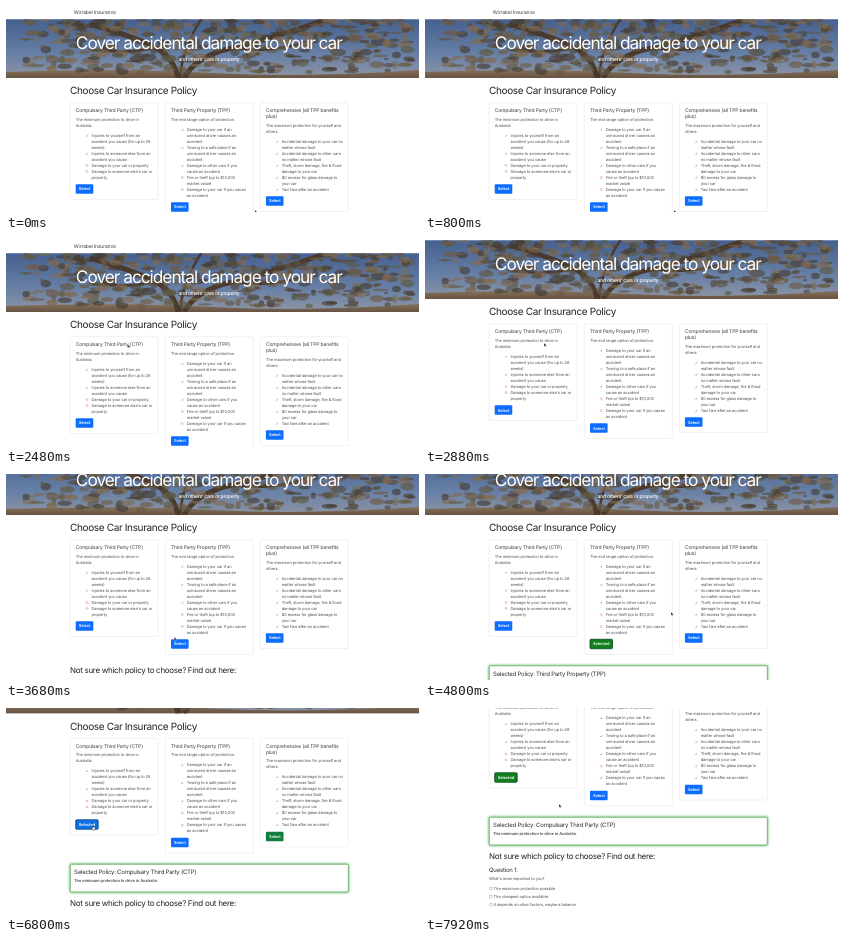
Write an HTML page that moves like this. It is 413 px wide and 206 px high and loops after 8 s.

```html
<!DOCTYPE html>
<html lang="en">
<head>
<meta charset="utf-8">
<title>Car insurance policies</title>
<style>
html, body { margin: 0; height: 100%; overflow: hidden; background: #fff; }
svg { display: block; width: 100vw; height: 100vh; }
text {
  font-family: Inter, Roboto, sans-serif; font-size: 4px; fill: #4a4f54;
  letter-spacing: -.02em; text-rendering: geometricPrecision; font-optical-sizing: none;
}
.h5 { font-size: 5px; letter-spacing: -.029em; fill: #3a3f44; }
.h4 { font-size: 6px; letter-spacing: -.037em; fill: #2a2e32; }
.h2 { font-size: 8px; letter-spacing: -.037em; fill: #212529; }
.h1 { font-size: 10px; letter-spacing: -.035em; fill: #212529; }
.hero { font-size: 17.3px; letter-spacing: -.0586em; }
.lead { font-size: 5px; font-weight: 500; letter-spacing: -.045em; }
.mid { text-anchor: middle; }
.w { fill: #fff; }
.b { font-weight: 600; letter-spacing: -.015em; }
.yes { fill: none; stroke: #4c6a5a; stroke-width: .45; }
.no { fill: none; stroke: #e57580; stroke-width: .35; }
.card { fill: #fff; stroke: #ebebeb; stroke-width: .7; }
</style>
</head>
<body>
<svg viewBox="0 0 413 206" preserveAspectRatio="none">
  <defs>
    <linearGradient id="sky" x2="0" y2="1">
      <stop stop-color="#45608f"/><stop offset=".6" stop-color="#6880a6"/><stop offset="1" stop-color="#8d95a3"/>
    </linearGradient>
    <linearGradient id="soil" x2="0" y2="1">
      <stop stop-color="#857058"/><stop offset="1" stop-color="#665343"/>
    </linearGradient>
    <clipPath id="frame"><path d="M0 13.3H413V72H0z"/></clipPath>
    <filter id="glow" x="-5%" y="-30%" width="110%" height="160%"><feGaussianBlur stdDeviation="1"/></filter>
  </defs>
  <g id="page"></g>
  <g id="cursor">
    <path id="arrow" d="M0 0V3.5L.9 2.7 1.5 4 2 3.8 1.5 2.5H2.6z" fill="#111" stroke="#fff" stroke-width=".3"/>
    <path id="hand" d="M-.4 .3Q0-.4 .4 .3V2L2.2 2.5V4L1.7 5.2H-.4L-1.6 3.2-1.1 2.8-.4 3.3z" fill="#fff" stroke="#111" stroke-width=".45"/>
  </g>
</svg>
<script>
const $ = id => document.getElementById(id);
const text = (x, y, s, cls = '', id = '') =>
  `<text x="${x}" y="${y}" class="${cls}" id="${id}">${s.replace('&', '&amp;')}</text>`;

// "|" breaks a line, a leading "-" marks something not covered
const policies = [
  { x: 64, title: 'Compulsary Third Party (CTP)', info: 'The minimum protection to drive in|Australia.', items: [
    'Injuries to yourself from an|accident you cause (for up to 26|weeks)',
    'Injuries to someone else from an|accident you cause',
    '-Damage to your car or property',
    "-Damage to someone else's car or|property"] },
  { x: 159.3, title: 'Third Party Property (TPP)', info: 'The mid range option of protection.', items: [
    'Damage to your car if an|uninsured driver causes an|accident',
    'Towing to a safe place if an|uninsured driver causes an|accident',
    'Damage to other cars if you|cause an accident',
    '-Fire or theft (up to $10,000|market value)',
    '-Damage to your car if you cause|an accident'] },
  { x: 254.2, title: 'Comprehensive (all TPP benefits|plus)', info: 'The maximum protection for yourself and|others.', items: [
    'Accidental damage to your car no|matter whose fault',
    'Accidental damage to other cars|no matter whose fault',
    'Theft, storm damage, fire & flood|damage to your car',
    '$0 excess for glass damage to|your car',
    'Taxi fare after an accident'] }
];

// soft gum-tree landscape behind the headline
function hero() {
  let seed = 11, out = '<g clip-path="url(#frame)"><path d="M0 13H413V72H0z" fill="url(#sky)"/>';
  const rnd = () => (seed = seed * 16807 % 2147483647) / 2147483647;
  const leaf = ['#54493a', '#6e5b45', '#453d34', '#806a50', '#5f5a44'];
  const limb = (d, w) => `<path d="${d}" fill="none" stroke="#4a3a2e" stroke-width="${w}"/>`;
  out += '<path d="M0 66Q110 62 206 67T413 64V72H0z" fill="url(#soil)"/>'
    + limb('M172 72Q168 52 150 42T84 18M178 72Q190 50 226 42T318 14', 5)
    + limb('M174 72Q176 42 196 12M150 42Q120 48 86 44M226 42Q262 48 300 36', 2.5);
  for (let i = 0; i < 420; i++) {
    const x = 20 + rnd() * 385, y = 13 + 54 * rnd() ** 1.2;
    out += `<ellipse cx="${x}" cy="${y}" rx="${2 + rnd() * 6}" ry="${1 + rnd() * 3}" fill="${leaf[i % 5]}" opacity=".65"/>`;
  }
  return out + '</g>' + text(202.8, 42.6, 'Cover accidental damage to your car', 'hero w mid')
    + text(203, 54.5, "and others' cars or property", 'lead w mid');
}

function card(p, i) {
  const left = p.x + 5.7;
  let y = 104.5, out = '';
  const lines = (s, x, cls, drop) => s.split('|').forEach(l => { out += text(x, y + drop, l, cls); y += 6; });
  lines(p.title, left, 'h5', 1.8);
  y += 3;
  lines(p.info, left, '', 1.45);
  y += 4;
  for (const item of p.items) {
    const x = p.x + 17, no = item[0] == '-';
    out += no
      ? `<path class="no" d="M${x - 1.1} ${y}a1.1 1.1 0 1 0 2.2 0a1.1 1.1 0 1 0-2.2 0M${x - .8} ${y - .8}l1.6 1.6"/>`
      : `<path class="yes" d="M${x - 1} ${y + .3}l.7.7 1.2-1.8"/>`;
    lines(no ? item.slice(1) : item, p.x + 21.5, '', 1.45);
  }
  p.left = left;
  p.y = y + 5.5;
  return `<rect class="card" x="${p.x}" y="96.7" width="88" height="${p.y - 86.2}" rx="1"/>` + out
    + `<rect id="btn${i}" x="${left}" y="${p.y - 4.75}" height="9.5" rx="1"/>` + text(left + 3, p.y + 1.45, '', 'w b', 'label' + i);
}

const box = 'x="64.3" y="222.8" width="278" height="27.6" rx="1"';
const options = ['The maximum protection possible', 'The cheapest option available', 'It depends on other factors, maybe a balance'];
$('page').innerHTML = text(67.8, 8.1, 'Wirrabel Insurance', 'h5') + hero()
  + text(64, 88.4, 'Choose Car Insurance Policy', 'h1') + policies.map(card).join('')
  + `<g id="panel"><rect ${box} fill="none" stroke="#4caf50" stroke-width="1.6" filter="url(#glow)"/>
     <rect ${box} fill="#fff" stroke="#3f963f" stroke-width=".6"/>`
  + text(68, 232.9, '', 'h4', 'chosen') + text(68, 240.7, '', 'b', 'detail') + '</g><g id="quiz">'
  + text(64, 264.4, 'Not sure which policy to choose? Find out here:', 'h2')
  + text(64, 277.7, 'Question 1:', 'h4') + text(64, 285, "What's most important to you?")
  + options.map((s, i) => `<circle cx="65.9" cy="${294 + 8 * i}" r="1.4" fill="#fff" stroke="#777" stroke-width=".4"/>`
    + text(68.6, 295.4 + 8 * i, s)).join('') + '</g>';

const clicks = [[3960, 1], [5800, 2], [6780, 0]];
const scroll = [[2560, 0], [3280, 31], [4800, 31], [5280, 66.5], [7120, 66.5], [7880, 113.5]];
const mouse = [[0, 249, 204], [800, 249, 204], [1600, 198, 144], [1840, 198, 144], [2560, 119, 103], [3200, 119, 103],
  [3800, 174, 170], [4240, 174, 170], [4720, 246, 138], [4880, 246, 138], [5360, 282, 125], [5520, 282, 125],
  [5760, 268, 128], [6080, 268, 128], [6640, 87, 117], [7120, 87, 117], [7680, 134, 96]];

// eased values between [time, ...values] keys
function track(keys, t) {
  const n = keys.findIndex(k => k[0] > t);
  if (n <= 0) return keys.at(n).slice(1);
  const a = keys[n - 1], b = keys[n], u = (t - a[0]) / (b[0] - a[0]), e = u * u * (3 - 2 * u);
  return a.slice(1).map((v, i) => v + (b[i + 1] - v) * e);
}

function draw(t) {
  const [top] = track(scroll, t), [mx, my] = track(mouse, t);
  const past = clicks.filter(c => c[0] <= t);
  const [when, now] = past.at(-1) || [0, -1], before = past.length > 1 ? past.at(-2)[1] : -1;
  const fade = Math.min(1, (t - when) / 150);
  let over = false;
  $('page').setAttribute('transform', `translate(0 ${-top})`);

  policies.forEach((p, i) => {
    const on = i == now, g = on ? fade : i == before ? 1 - fade : 0, w = on ? 22.5 : 17.6;
    const mix = (a, b) => a + (b - a) * g, btn = $('btn' + i);
    btn.setAttribute('width', w);
    btn.setAttribute('fill', `rgb(${mix(13, 16)},${mix(110, 128)},${mix(253, 32)})`);
    btn.setAttribute('stroke', on ? `rgb(${mix(20, 8)},${mix(70, 72)},${mix(150, 20)})` : 'none');
    btn.setAttribute('stroke-width', .8);
    $('label' + i).textContent = on ? 'Selected' : 'Select';
    over ||= mx > p.left && mx < p.left + w && Math.abs(my + top - p.y) < 4.75;
  });

  const p = policies[now];
  $('panel').style.display = p ? '' : 'none';
  $('quiz').setAttribute('transform', `translate(0 ${p ? 0 : -34})`);
  if (p) {
    $('chosen').textContent = 'Selected Policy: ' + p.title.replace('|', ' ');
    $('detail').textContent = p.info.replace('|', ' ');
  }
  $('cursor').setAttribute('transform', `translate(${mx} ${my})`);
  $('arrow').style.display = over ? 'none' : '';
  $('hand').style.display = over ? '' : 'none';
}

const start = performance.now();
function tick() {
  const t = (performance.now() - start) % 8000;
  draw(Math.floor(t / 80) * 80);
  requestAnimationFrame(tick);
}
tick();
</script>
</body>
</html>
```
